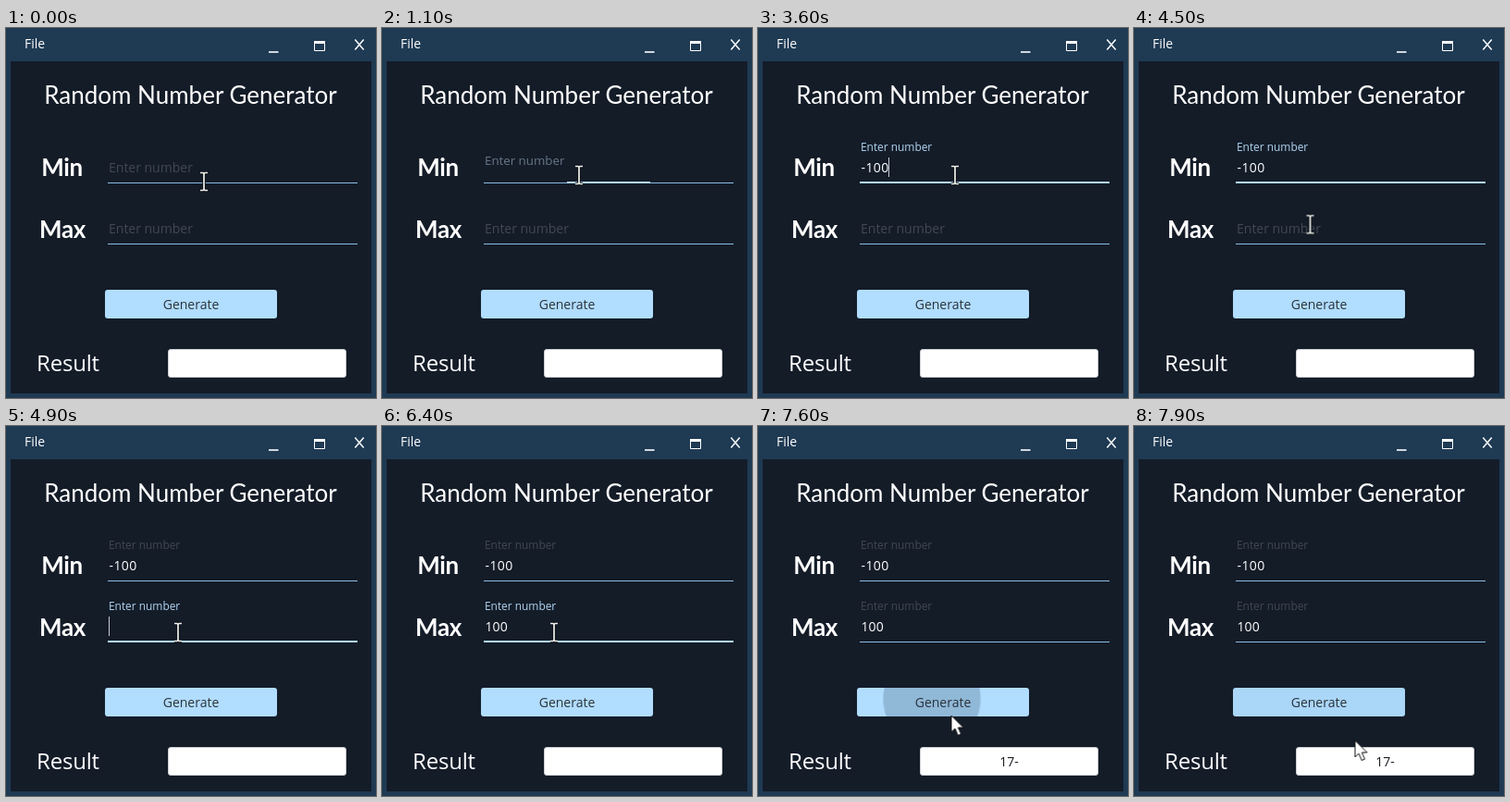
Animation of 400 by 400 pixels, one loop 8000 ms. Source, as an HTML page:

```html
<!DOCTYPE html>
<html lang="en">
<head>
<meta charset="utf-8">
<title>Random Number Generator</title>
<style>
html, body { margin: 0; width: 100%; height: 100%; overflow: hidden; background: #1f3a53; }
svg { display: block; width: 400px; height: 400px; }
text { font: 14px "Open Sans", "Noto Sans", sans-serif; fill: #fff; }
.hand { font: 26px Lato, sans-serif; text-anchor: middle; }
.bold { font-weight: 700; letter-spacing: -.4px; }
.mid { text-anchor: middle; }
.dark { fill: #2b333b; }
.big { font-size: 24px; letter-spacing: -.2px; }
.min { letter-spacing: .35px; }
.line { fill: #8abde6; }
.focus { fill: #b3dcff; transform-box: fill-box; transform-origin: center; }
.caret { fill: #c9ced4; }

/* 100 ms = 1.25% of the loop */
.anim, .key { animation: 8s step-end infinite; }

.min-label { animation-name: min-label; }
.max-label { animation-name: max-label; }
.min-focus { animation-name: min-focus; }
.max-focus { animation-name: max-focus; }
.min-caret { animation-name: min-caret; }
.max-caret { animation-name: max-caret; }
.pointer { animation-name: move; }
.beam { animation-name: beam; }
.arrow { animation-name: arrow; }
.ripple { animation-name: ripple; }

@keyframes min-label {
  0% { fill: #434951; transform: none; }
  12.5% { fill: #434951; transform: none; animation-timing-function: steps(3); }
  16.25% { fill: #b1d6f2; transform: translateY(-23px) scale(.85); }
  58.75%, 100% { fill: #434951; transform: translateY(-23px) scale(.85); }
}
@keyframes max-label {
  0% { fill: #434951; transform: none; }
  57.5% { fill: #434951; transform: none; animation-timing-function: steps(3); }
  61.25% { fill: #b1d6f2; transform: translateY(-23px) scale(.85); }
  91.25%, 100% { fill: #434951; transform: translateY(-23px) scale(.85); }
}
@keyframes min-focus {
  0% { transform: scaleX(0); }
  12.5% { transform: scaleX(0); animation-timing-function: steps(3); }
  16.25% { transform: none; }
  58.75%, 100% { transform: scaleX(0); }
}
@keyframes max-focus {
  0% { transform: scaleX(0); }
  57.5% { transform: scaleX(0); animation-timing-function: steps(3); }
  61.25% { transform: none; }
  91.25%, 100% { transform: scaleX(0); }
}
@keyframes min-caret {
  0% { opacity: 0; transform: none; }
  15% { opacity: 1; transform: none; }
  21.25% { opacity: 0; transform: none; }
  27.5% { opacity: 1; transform: translateX(6px); }
  33.75% { opacity: 0; transform: translateX(6px); }
  38.75% { opacity: 1; transform: translateX(14px); }
  41.25% { opacity: 1; transform: translateX(22px); }
  45% { opacity: 1; transform: translateX(30px); }
  51.25%, 100% { opacity: 0; transform: translateX(30px); }
}
@keyframes max-caret {
  0% { opacity: 0; transform: none; }
  60% { opacity: 1; transform: none; }
  66.25% { opacity: 0; transform: none; }
  70% { opacity: 1; transform: translateX(8px); }
  71.25% { opacity: 1; transform: translateX(16px); }
  73.75% { opacity: 1; transform: translateX(24px); }
  80% { opacity: 0; transform: translateX(24px); }
  86.25% { opacity: 1; transform: translateX(24px); }
  91.25%, 100% { opacity: 0; transform: translateX(24px); }
}

/* typed characters and the result */
@keyframes key1 { 0% { fill: transparent; } 27.5%, 100% { fill: #fff; } }
@keyframes key2 { 0% { fill: transparent; } 38.75%, 100% { fill: #fff; } }
@keyframes key3 { 0% { fill: transparent; } 41.25%, 100% { fill: #fff; } }
@keyframes key4 { 0% { fill: transparent; } 45%, 100% { fill: #fff; } }
@keyframes key5 { 0% { fill: transparent; } 70%, 100% { fill: #fff; } }
@keyframes key6 { 0% { fill: transparent; } 71.25%, 100% { fill: #fff; } }
@keyframes key7 { 0% { fill: transparent; } 73.75%, 100% { fill: #fff; } }
@keyframes answer { 0% { fill: transparent; } 95%, 100% { fill: #15191e; } }

@keyframes move {
  0% { transform: translate(214px, 166px); }
  6.25% { transform: translate(214px, 166px); animation-timing-function: steps(4); }
  11.25% { transform: translate(213px, 159px); }
  50% { transform: translate(213px, 159px); animation-timing-function: steps(6); }
  57.5% { transform: translate(186px, 223px); }
  81.25% { transform: translate(186px, 223px); animation-timing-function: steps(7); }
  90% { transform: translate(188.5px, 295px); }
  92.5% { transform: translate(188.5px, 295px); animation-timing-function: steps(5); }
  98.75%, 100% { transform: translate(238.5px, 340px); }
}
@keyframes beam {
  0% { opacity: 1; }
  51.25% { opacity: 0; }
  56.25% { opacity: 1; }
  83.75%, 100% { opacity: 0; }
}
@keyframes arrow {
  0% { opacity: 0; }
  51.25% { opacity: 1; }
  56.25% { opacity: 0; }
  83.75%, 100% { opacity: 1; }
}
@keyframes ripple {
  0% { transform: scale(0); opacity: .5; }
  90% { transform: scale(0); opacity: .5; animation-timing-function: steps(2); }
  92.5% { transform: scale(14.5); opacity: .5; animation-timing-function: steps(5); }
  98.75%, 100% { transform: scale(110); opacity: .06; }
}
</style>
</head>
<body>
<svg viewBox="0 0 400 400">
  <defs>
    <clipPath id="face"><rect x="107" y="283" width="186" height="31" rx="3"/></clipPath>
  </defs>

  <rect width="400" height="400" fill="#1f3a53"/>
  <rect x="5" y="36" width="390" height="359" fill="#141c28"/>

  <text x="20" y="22">File</text>
  <g fill="none" stroke="#fff">
    <path d="M284 26h10.5" stroke-width="1.6"/>
    <path d="M333.5 15v9.5h11V15"/>
    <path d="M333 15.5h12" stroke-width="3"/>
    <path d="M377.3 12.5l9.4 11M386.7 12.5l-9.4 11" stroke-width="1.5"/>
  </g>

  <text class="hand" x="199.5" y="82">Random Number Generator</text>
  <text class="hand bold" x="60.5" y="160">Min</text>
  <text class="hand bold" x="61" y="227">Max</text>

  <rect class="line" x="110" y="167" width="270" height="1"/>
  <rect class="focus anim min-focus" x="110" y="166" width="270" height="2"/>
  <g transform="translate(111 156)">
    <text class="anim min-label">Enter number</text>
    <text class="min" x=".6"><tspan class="key" style="animation-name:key1">-</tspan><tspan class="key" style="animation-name:key2">1</tspan><tspan class="key" style="animation-name:key3">0</tspan><tspan class="key" style="animation-name:key4">0</tspan></text>
    <rect class="caret anim min-caret" y="-16" width="1" height="21"/>
  </g>

  <rect class="line" x="110" y="233" width="270" height="1"/>
  <rect class="focus anim max-focus" x="110" y="232" width="270" height="2"/>
  <g transform="translate(111 222)">
    <text class="anim max-label">Enter number</text>
    <text x=".6"><tspan class="key" style="animation-name:key5">1</tspan><tspan class="key" style="animation-name:key6">0</tspan><tspan class="key" style="animation-name:key7">0</tspan></text>
    <rect class="caret anim max-caret" y="-16" width="1" height="21"/>
  </g>

  <g clip-path="url(#face)">
    <rect x="107" y="283" width="186" height="31" fill="#b1ddff"/>
    <g transform="translate(188 295)"><circle class="anim ripple" r="1" fill="#4d6b84"/></g>
  </g>
  <text class="mid dark" x="200" y="304">Generate</text>

  <text class="big" x="33" y="371">Result</text>
  <rect x="175.5" y="347.5" width="192" height="30" rx="2.5" fill="#fff" stroke="#c9cdd2"/>
  <text class="mid key" style="animation-name:answer" x="271.5" y="368">17-</text>

  <g class="anim pointer">
    <g class="anim beam" fill="none">
      <path d="M-4-9.5h3L0-8.5 1-9.5h3M0-8.5v17M-4 9.5h3L0 8.5l1 1h3" stroke="#0b0f15" stroke-width="3.5"/>
      <path d="M-4-9.5h3L0-8.5 1-9.5h3M0-8.5v17M-4 9.5h3L0 8.5l1 1h3" stroke="#f2f2ee" stroke-width="1.7"/>
    </g>
    <path class="anim arrow" d="M.5 0v18l4-4 3.2 7.5 3.3-1.4L7.9 13h5.6z" fill="#fff" stroke="#111" stroke-width="1"/>
  </g>
</svg>
</body>
</html>
```
